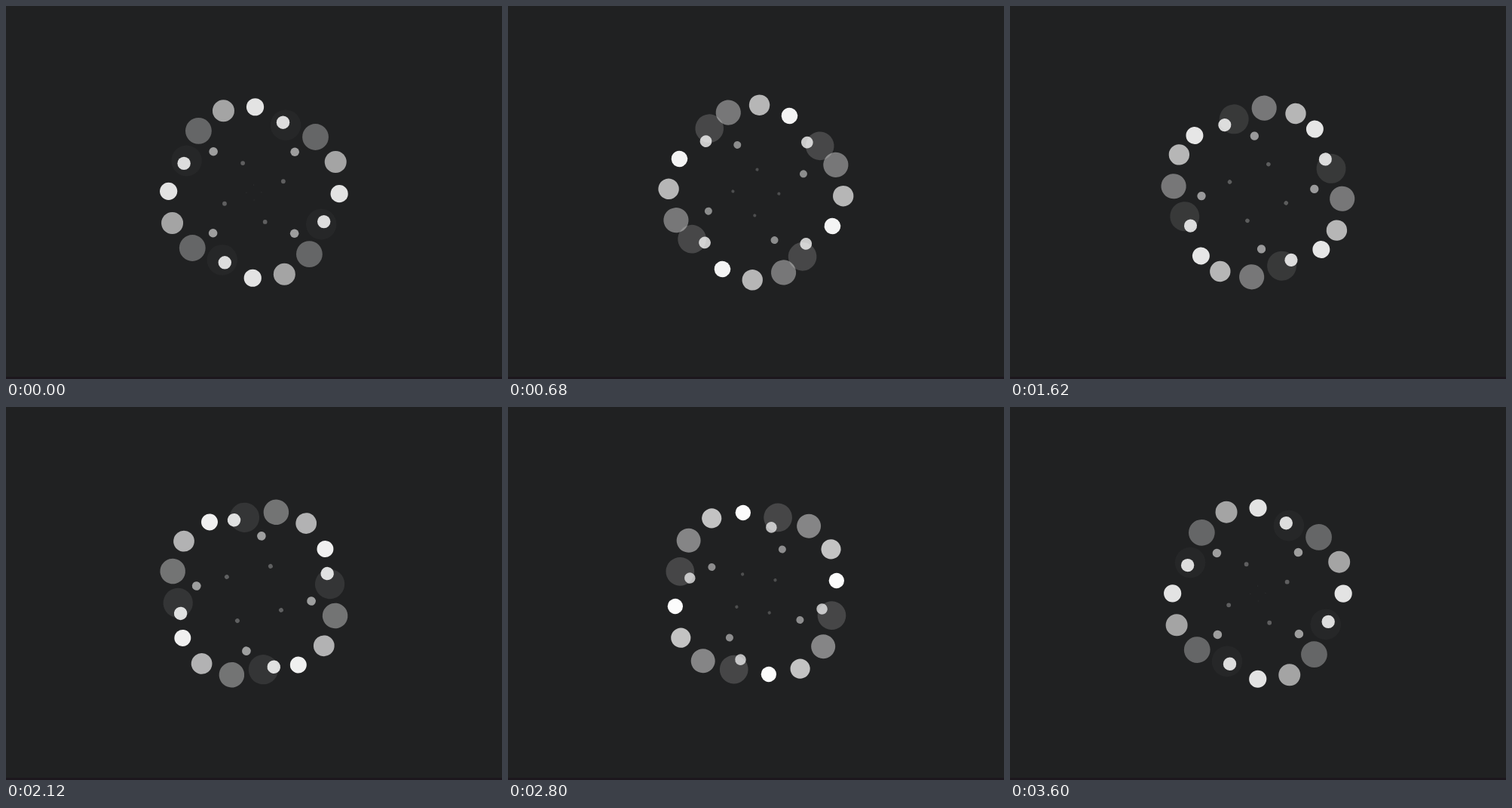
An HTML page with a canvas for the animation above (3620 ms loop, 658 by 494 pixels).

```html
<!DOCTYPE html>
<html lang="en">
<head>
<meta charset="utf-8">
<title>Spiral loader</title>
<style>
  html, body { margin: 0; width: 100%; height: 100%; overflow: hidden; background: #202122; }
  canvas { display: block; }
</style>
</head>
<body>
<canvas id="stage" width="658" height="494"></canvas>
<script>
const ctx = document.getElementById('stage').getContext('2d');

const LOOP = 3620, TICK = 20;
const SPAWN = 532;              // ms between two dots of an arm
const SHORTFALL = 0.233;        // one gap per loop is shorter by this share
const LIFE = 7.1;               // dot lifetime, in spawn intervals
const SPIN = 89.25 / 3600;      // degrees per ms
const RES = 100;                // path samples per spawn interval
const rad = deg => deg * Math.PI / 180;

// Constant-speed spiral from the centre outwards, bending less and less.
const path = [[0, 0]];
for (let i = 0; i < LIFE * RES; i++) {
  const u = (i + 0.5) / RES;
  const heading = rad(274.7 - 537 * (1 - Math.exp(-0.098 * u)));
  const [x, y] = path[i];
  path.push([x + 43 / RES * Math.cos(heading), y + 43 / RES * Math.sin(heading)]);
}

function pointAt(u) {
  const i = Math.floor(u * RES), f = u * RES - i;
  const [a, b] = [path[i], path[i + 1]];
  return [a[0] + (b[0] - a[0]) * f, a[1] + (b[1] - a[1]) * f];
}

function drawArm(t) {
  for (let k = 0; k <= 14; k++) {
    const u = k + SHORTFALL * (1 - Math.ceil(k / 7)) - t / SPAWN;
    if (u <= 0 || u >= LIFE) continue;
    ctx.globalAlpha = 1 - Math.abs(2 * u / LIFE - 1);
    ctx.beginPath();
    ctx.arc(...pointAt(u), 2.9 * u, 0, 2 * Math.PI);
    ctx.fill();
  }
}

function draw() {
  const t = Math.floor(performance.now() % LOOP / TICK) * TICK;
  ctx.globalAlpha = 1;
  ctx.fillStyle = '#202122';
  ctx.fillRect(0, 0, 658, 494);
  ctx.fillStyle = '#1c171d';
  ctx.fillRect(0, 491, 658, 3);

  ctx.save();
  ctx.translate(328.9, 247);
  ctx.rotate(rad(SPIN * t));
  ctx.fillStyle = '#fff';
  for (let arm = 0; arm < 4; arm++) {
    drawArm(t);
    ctx.rotate(Math.PI / 2);
  }
  ctx.restore();
  requestAnimationFrame(draw);
}
draw();
</script>
</body>
</html>
```
